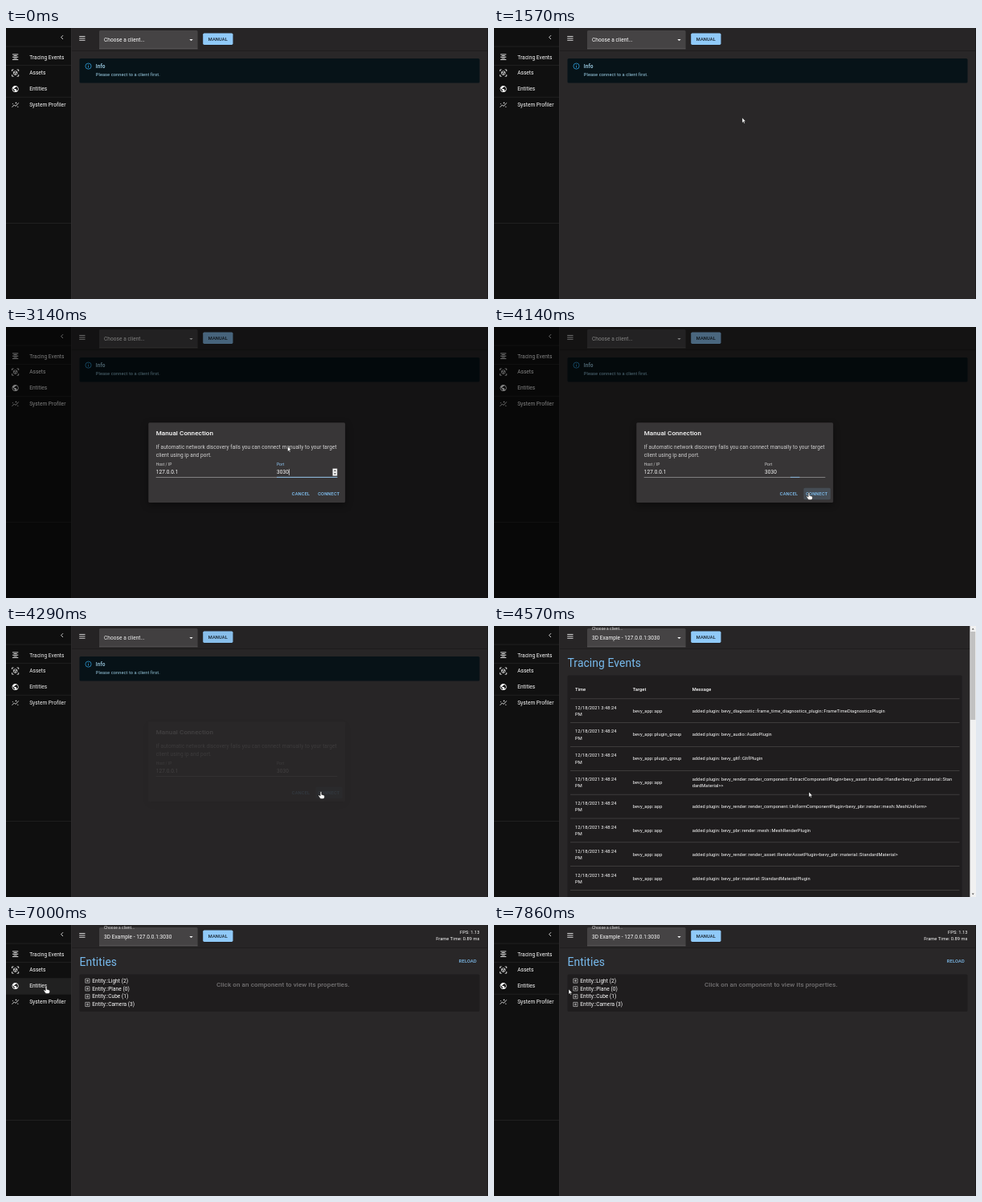
An HTML page for the animation above (8 s loop, 600 by 338 pixels).

```html
<!DOCTYPE html>
<html lang="en">
<head>
<meta charset="utf-8">
<title>Inspector</title>
<style>
html, body { margin: 0; width: 100%; height: 100%; overflow: hidden; background: #292728; }
svg { display: block; width: 100vw; height: 100vh; }
text { font-family: Roboto, sans-serif; fill: #fff; white-space: pre; }
.b1 { font-size: 6.53px; letter-spacing: .0094em; }
.b2 { font-size: 5.7px; letter-spacing: .0107em; }
.cap { font-size: 4.9px; letter-spacing: .0094em; }
.btn { font-size: 5.7px; font-weight: 500; letter-spacing: .0286em; fill: #82c3f5; }
.h4 { font-size: 13.85px; letter-spacing: .0074em; fill: #78bbee; }
.h6 { font-size: 8.1px; font-weight: 500; letter-spacing: .0075em; }
.med { font-weight: 500; }
.end { text-anchor: end; }
.line { fill: none; stroke: #fff; }
</style>
</head>
<body>
<svg id="stage" viewBox="0 0 600 338" preserveAspectRatio="none"></svg>
<script>
const U = 0.408; // CSS pixel to stage unit
const FRAME = 1000 / 7, LOOP = 8000, COUNT = 56;

const text = (x, y, s, cls = 'b1', extra = '') =>
  `<text x="${x}" y="${y}" class="${cls}" ${extra}>${s.replace(/</g, '&lt;').replace(/>/g, '&gt;')}</text>`;
const rect = (x, y, w, h, fill, extra = '') =>
  `<rect x="${x}" y="${y}" width="${w}" height="${h}" fill="${fill}" ${extra}/>`;
const group = (id, body, extra = '') => `<g id="${id}" ${extra}>${body}</g>`;
const icon = (cx, cy, body) =>
  `<g transform="translate(${cx} ${cy}) scale(${U}) translate(-12 -12)" fill="#fff">${body}</g>`;
const stroke = (d, w = 2) => `<path class="line" stroke-width="${w}" d="${d}"/>`;

const items = [
  ['Tracing Events', stroke('M3 4h18M7 8h10M3 12h18M7 16h10M3 20h18')],
  ['Assets', stroke('M2 7V2h5M17 2h5v5M22 17v5h-5M7 22H2v-5') +
    stroke('M12 6l5.5 3v6L12 18l-5.5-3V9zM6.5 9l5.5 3 5.5-3M12 12v6', 1.8)],
  ['Entities', '<path d="M12 2C6.5 2 2 6.5 2 12s4.500 10 10 10 10-4.500 10-10S17.500 2 12 2zm-1 17.900c-3.900-.5-7-3.800-7-7.900 0-.6.1-1.200.2-1.800L9 15v1c0 1.100.9 2 2 2zm6.900-2.500c-.3-.8-1-1.400-1.900-1.400h-1v-3c0-.6-.4-1-1-1H8v-2h2c.6 0 1-.4 1-1V7h2c1.100 0 2-.9 2-2v-.4c2.900 1.200 5 4 5 7.400 0 2.100-.8 4-2.100 5.400z"/>'],
  ['System Profiler', stroke('M2 19l7-7 4 4 9-10', 2) +
    '<path d="M14 9l1-2 2-1-2-1-1-2-1 2-2 1 2 1zM4 11l.6-1.400L6 9l-1.400-.6L4 7l-.6 1.400L2 9l1.400.6zM20 20l.7-1.500 1.500-.7-1.500-.7L20 15.600l-.7 1.500-1.500.7 1.500.7z"/>'],
];
const itemY = i => 36.2 + i * 19.9;

const sidebar = rect(0, 0, 81, 338, '#101010') + rect(81, 0, .5, 338, '#363435') +
  [22.8, 46, 85.9, 243].map(y => rect(0, y, 81, .5, '#fff', 'opacity=".13"')).join('') +
  rect(0, 0, 81, 19.6, '#fff', 'id="hover" opacity=".07"') +
  stroke('M71 9.200l-2.400 2.400 2.400 2.400', .8) +
  items.map(([name, art], i) => icon(11.6, itemY(i), art) + text(29.2, itemY(i) + 2.3, name)).join('');

const topBar = rect(81.5, 0, 518.5, 28, '#272526') + rect(81.5, 28, 518.5, .8, '#000', 'opacity=".3"') +
  stroke('M91.200 10.500h7.300M91.200 12.900h7.300M91.200 15.300h7.300', .8) +
  '<path d="M116 26V4.600a1.600 1.600 0 0 1 1.600-1.600H237a1.600 1.600 0 0 1 1.600 1.600V26z" fill="#454344"/>' +
  rect(116, 25.8, 122.600, .4, '#fff', 'opacity=".4"') +
  '<path d="M228.300 13.900h4.400l-2.200 2.200z" fill="#fff"/>' +
  text(122, 16.9, 'Choose a client...', 'b1', 'id="prompt"') +
  group('chosen', text(122, 4.8, 'Choose a client...', 'cap', 'opacity=".85"') +
    text(122, 17.1, '3D Example - 127.0.0.1:3030')) +
  rect(245.4, 7.4, 37, 14, '#000', 'rx="1.6" opacity=".25"') +
  rect(245.2, 6.6, 37.300, 14.300, '#90caf9', 'rx="1.6" id="manual"') +
  text(251.7, 15.8, 'MANUAL', 'btn', 'style="fill:#15202a"') +
  group('stats', text(582.4, 11.3, 'FPS: 1.13', 'b2 end') + text(582.4, 19.4, 'Frame Time: 0.89 ms', 'b2 end'));

const info = rect(91.5, 38, 498, 30.5, '#071318', 'rx="1.6"') +
  '<circle cx="102.500" cy="47.600" r="3.600" class="line" style="stroke:#2f9fdc" stroke-width=".8"/>' +
  '<path d="M102.100 47h.8v2.500h-.8zM102.100 45.400h.8v.9h-.8z" fill="#2f9fdc"/>' +
  text(111.8, 49.7, 'Info', 'b1 med', 'style="fill:#a9dcf5"') +
  text(111.8, 60.4, 'Please connect to a client first.', 'b2', 'style="fill:#a0d4ec"');

const render = 'bevy_render::render_';
const events = [
  ['app', 'bevy_diagnostic::frame_time_diagnostics_plugin::FrameTimeDiagnosticsPlugin'],
  ['plugin_group', 'bevy_audio::AudioPlugin'],
  ['plugin_group', 'bevy_gltf::GltfPlugin'],
  ['app', render + 'component::ExtractComponentPlugin<bevy_asset::handle::Handle<bevy_pbr::material::Stan', 'dardMaterial>>'],
  ['app', render + 'component::UniformComponentPlugin<bevy_pbr::render::mesh::MeshUniform>'],
  ['app', 'bevy_pbr::render::mesh::MeshRenderPlugin'],
  ['app', render + 'asset::RenderAssetPlugin<bevy_pbr::material::StandardMaterial>'],
  ['app', 'bevy_pbr::material::StandardMaterialPlugin'],
];
const eventRow = ([target, msg, rest], i) => {
  const y = 105.5 + i * 29.86;
  return text(101, y - 2, '12/18/2021 3:48:24', 'b2') + text(101, y + 6.3, 'PM', 'b2') +
    text(172.8, y + 2, 'bevy_app::' + target, 'b2') +
    text(246.7, rest ? y - 2 : y + 2, 'added plugin: ' + msg, 'b2') +
    (rest ? text(246.7, y + 6.1, rest, 'b2') : '') +
    rect(95, y + 14.8, 484.500, .5, '#5a5859');
};
const tracing = text(91.5, 51, 'Tracing Events', 'h4') +
  rect(91.5, 61.5, 491, 290, '#1f1d1e', 'rx="1.6"') +
  [[101, 'Time'], [172.8, 'Target'], [246.7, 'Message']].map(([x, s]) => text(x, 81, s, 'b2 med')).join('') +
  rect(95, 90.6, 484.500, .5, '#5a5859') +
  group('rows', events.map(eventRow).join(''));

const scrollbar = rect(592.4, 0, 7.6, 338, '#f1f1f1') + rect(593.2, 7, 6, 110, '#c1c1c1') +
  '<path d="M594.700 4.500l1.500-1.800 1.500 1.800zM594.700 333.500l1.500 1.800 1.500-1.800z" fill="#505050"/>';

const entities = text(91.5, 51, 'Entities', 'h4') + text(563.8, 46.6, 'RELOAD', 'btn') +
  rect(91.5, 61.5, 498, 46.5, '#1f1d1e', 'rx="1.6"') +
  ['Light (2)', 'Plane (0)', 'Cube (1)', 'Camera (3)'].map((s, i) => {
    const y = 69.6 + i * 9.8;
    return stroke(`M98.800 ${y - 2.6}h5.200v5.200h-5.200zM99.800 ${y}h3.200M101.400 ${y - 1.6}v3.200`, .5) +
      text(107.3, y + 2.2, 'Entity::' + s);
  }).join('') +
  text(262, 77.4, 'Click on an component to view its properties.', 'h6', 'style="fill:#737172"');

const dialog = rect(177.3, 119.2, 244.900, 99.8, '#383637', 'rx="1.6" style="filter:drop-shadow(0 3px 5px rgba(0,0,0,.4))"') +
  text(186.7, 135, 'Manual Connection', 'h6') +
  text(186.7, 152.3, 'If automatic network discovery fails you can connect manually to your target', 'b1', 'opacity=".78"') +
  text(186.7, 162, 'client using ip and port.', 'b1', 'opacity=".78"') +
  text(186.7, 172.5, 'Host / IP', 'cap', 'opacity=".8"') +
  text(337, 172.5, 'Port', 'cap', 'id="portLabel"') +
  text(186.7, 183.4, '127.0.0.1') + text(337, 183.4, '3030') +
  rect(186.7, 187.1, 225.700, .5, '#fff', 'opacity=".75"') +
  rect(-37.7, 0, 75.4, .8, '#90caf9', 'id="focusLine"') +
  rect(352.3, 177.2, .6, 7.800, '#fff', 'id="caret"') +
  group('spinner', rect(406.6, 176.6, 5.700, 9, '#f0f0f0') +
    '<path d="M408 180l1.500-1.700 1.500 1.700zM408 182.300l1.500 1.700 1.500-1.700z" fill="#444"/>') +
  rect(385.4, 200.8, 33.500, 14.400, '#90caf9', 'rx="1.6" id="connect"') +
  text(355.8, 210, 'CANCEL', 'btn') + text(388.2, 210, 'CONNECT', 'btn');

const cursor =
  group('arrow', '<path d="M0 0V16l3.700-3.600 2.400 5.600 2.500-1-2.400-5.600H11z"/>') +
  group('hand', '<path d="M-2 1a2 2 0 0 1 4 0V8l6 1.500q3 .8 3 3V16q0 5-5 5H1q-3 0-5-4l-4-6q1-2 3-1l3 2.500z"/>');

document.getElementById('stage').innerHTML =
  rect(0, 0, 600, 338, '#292728') + topBar + sidebar +
  group('info', info) + group('tracing', tracing) + group('entities', entities) +
  rect(599.2, 0, .8, 338, '#181718') + group('scrollbar', scrollbar) +
  rect(0, 0, 600, 338, '#000', 'id="backdrop"') + group('dialog', dialog) +
  group('cursor', cursor, 'fill="#fff" stroke="#000" stroke-width="1"');

const el = {};
document.querySelectorAll('[id]').forEach(n => el[n.id] = n);
const show = (id, on) => el[id].style.display = on ? '' : 'none';
const clamp = v => Math.min(1, Math.max(0, v));
const smooth = p => p * p * (3 - 2 * p);
const within = (t, a, b) => t >= a && t < b;

// time, x, y, eased arrival
const path = [
  [1420, 330, 150], [1850, 256, 16, 1], [2560, 256, 16], [3480, 392, 207, 1], [4750, 392, 207],
  [5857, 146, 176], [6285, 74, 81.5], [6570, 50, 77], [7140, 50, 77], [7850, 93, 80, 1],
];
function pointer(t) {
  const i = path.findIndex(p => p[0] > t);
  if (i < 0) return path[path.length - 1].slice(1, 3);
  if (i === 0) return path[0].slice(1, 3);
  const [t0, x0, y0] = path[i - 1], [t1, x1, y1, eased] = path[i];
  const p = (t - t0) / (t1 - t0), q = eased ? smooth(p) : p;
  return [x0 + (x1 - x0) * q, y0 + (y1 - y0) * q];
}

const OPEN = 2050, FOCUS = 2130, BLUR = 4050, CLOSE = 4125;
const JOINED = 4420, LOADED = 4560, STATS = 4850, SWITCH = 7000;

function draw(t) {
  const [x, y] = pointer(t);
  const modal = within(t, OPEN, 4330);
  const fade = smooth(clamp((t - OPEN) / 225)) - smooth(clamp((t - CLOSE) / 205));
  const focused = within(t, FOCUS, BLUR);
  const joined = t >= JOINED, switched = t >= SWITCH;

  show('prompt', !joined);
  show('chosen', joined);
  show('info', !joined);
  show('tracing', joined && !switched);
  show('rows', t >= LOADED);
  show('scrollbar', t >= LOADED && !switched);
  show('entities', switched);
  show('stats', t >= STATS);
  el.stats.setAttribute('transform', `translate(${switched ? 7.200 : 0} 0)`);

  show('backdrop', modal);
  show('dialog', modal);
  el.backdrop.setAttribute('opacity', fade * .5);
  el.dialog.setAttribute('opacity', fade);
  el.portLabel.style.fill = focused ? '#90caf9' : '#d4d4d4';
  show('spinner', focused);
  show('caret', focused && Math.floor((t - FOCUS) / 500) % 2 === 0);
  const grow = 1 - (1 - clamp((t - FOCUS) / 200)) ** 3;
  const shrink = (1 - clamp((t - BLUR) / 200)) ** 3;
  el.focusLine.setAttribute('transform', `translate(374.700 186.900) scale(${grow * shrink} 1)`);

  const onManual = !modal && within(x, 245, 283) && within(y, 6, 21);
  const onConnect = modal && within(x, 385, 419) && within(y, 200, 216);
  const item = x < 81 && t > 5000 ? Math.floor((y - 26.3) / 19.9) : -1;
  const onItem = item >= 0 && item < items.length;
  el.manual.setAttribute('fill', onManual ? '#6db7f6' : '#90caf9');
  show('connect', onConnect);
  el.connect.setAttribute('opacity', t > BLUR ? .16 : .09);
  show('hover', onItem);
  if (onItem) el.hover.setAttribute('y', 26.4 + item * 19.9);

  const hand = onManual || onConnect || onItem;
  show('cursor', t >= path[0][0]);
  show('hand', hand);
  show('arrow', !hand);
  el.cursor.setAttribute('transform', `translate(${x} ${y}) scale(${U})`);
}

function tick() {
  const t = performance.now() % LOOP;
  draw(Math.min(COUNT - 1, Math.floor((t + 5) / FRAME)) * FRAME);
  requestAnimationFrame(tick);
}
tick();
</script>
</body>
</html>
```
